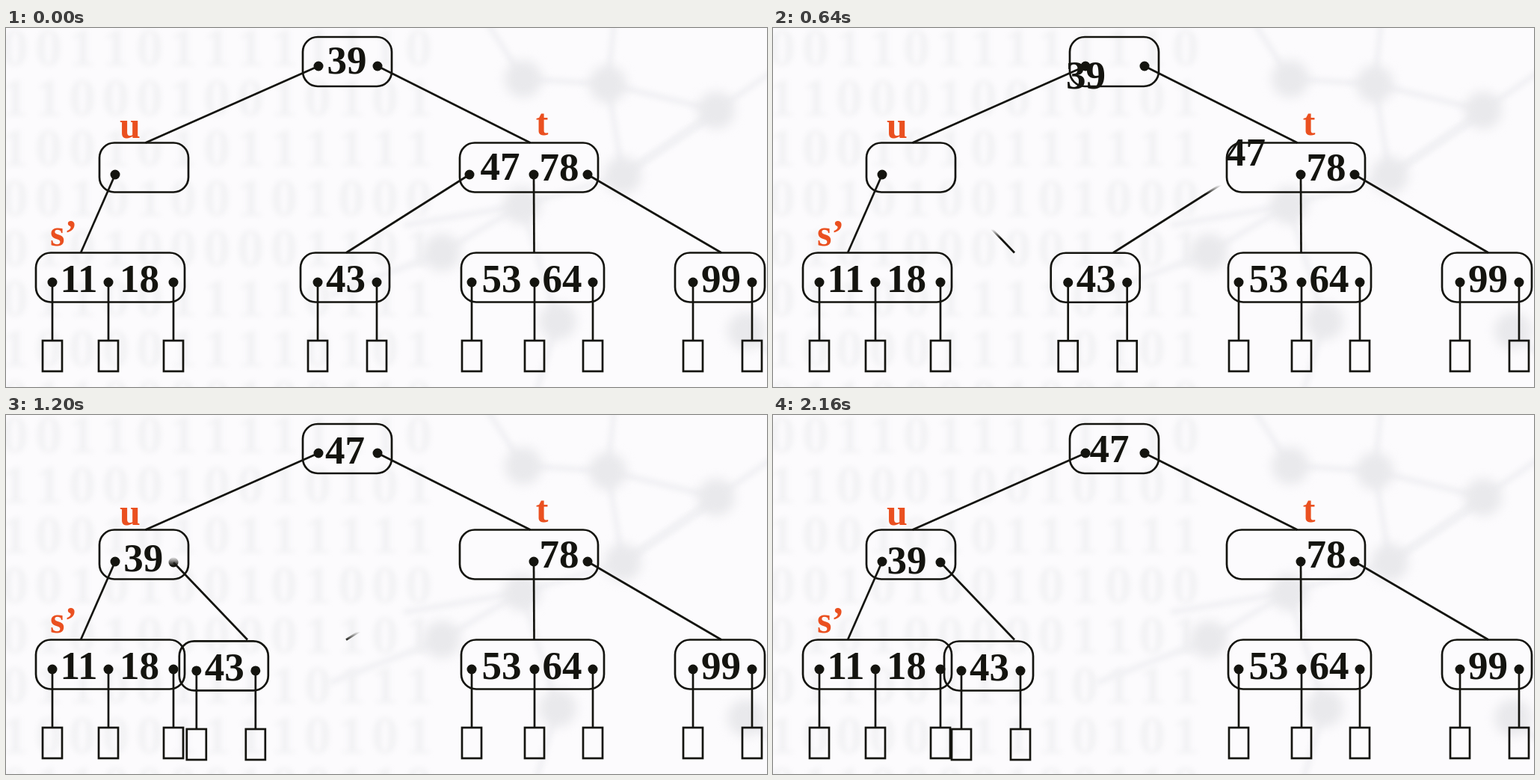
These frames come from a looping animation (1018x480 px, 2.2 s). An HTML page with a canvas:

```html
<!DOCTYPE html>
<html lang="en">
<head>
<meta charset="utf-8">
<title>Tree key transfer</title>
<style>
html, body { margin: 0; width: 100%; height: 100%; overflow: hidden; background: #fcfbfd; }
canvas { display: block; }
</style>
</head>
<body>
<canvas id="stage" width="1018" height="480"></canvas>
<script>
const W = 1018, H = 480, LOOP = 2200, STEP = 40, START = 366;
const PAPER = '#fcfbfd', INK = '#14140f', CLEAR = 'rgba(20,20,15,0)', LABEL = '#ea5020';
const SERIF = '"Liberation Serif", "Times New Roman", serif';
const ctx = document.getElementById('stage').getContext('2d');

// Vertical layout of the three tree levels
const ROOT = { top: 12, dot: 51, base: 61 };
const INNER = { top: 153.5, dot: 196, base: 204 };
const LEAF = { top: 300.5, dot: 340, base: 353 };

const node = (row, x, w, dots, keys = []) => ({ row, x, w, dots, keys });
const root = node(ROOT, 397, 119, [418, 497]);
const nodeU = node(INNER, 125, 119, [146]);
const nodeT = node(INNER, 607, 185, [706, 778], ['78']);
const left = node(LEAF, 40, 199, [62, 137, 224], ['11', '18']);
const moved = node(LEAF, 394, 119, [417, 496], ['43']);
const middle = node(LEAF, 609, 191, [623, 707, 785], ['53', '64']);
const right = node(LEAF, 895, 120, [919, 998], ['99']);

function layer() {
  const c = document.createElement('canvas');
  c.width = W;
  c.height = H;
  return c;
}

function line(g, x1, y1, x2, y2) {
  g.beginPath();
  g.moveTo(x1, y1);
  g.lineTo(x2, y2);
  g.stroke();
}

function disc(g, x, y, r) {
  g.beginPath();
  g.arc(x, y, r, 0, Math.PI * 2);
  g.fill();
}

function pen(g, paint = INK) {
  g.strokeStyle = g.fillStyle = paint;
  g.lineWidth = 2.7;
}

function text(g, str, x, y, size = 53) {
  g.font = `bold ${size}px ${SERIF}`;
  g.textAlign = 'center';
  g.fillText(str, x, y);
}

// Soft rows of binary digits
function paintDigits(g) {
  let seed = 17;
  const rand = () => (seed = (seed * 16807) % 2147483647) / 2147483647;
  g.filter = 'blur(3px)';
  g.fillStyle = '#f2f2f4';
  for (let y = 50; y < H + 50; y += 67) {
    for (let x = 12; x < 560; x += 45) text(g, rand() < 0.5 ? '0' : '1', x, y, 72);
  }
}

// Faint network: near nodes are linked, and each sends a spoke outward
function paintNetwork(g) {
  const hubs = [[692, 68], [805, 75], [950, 110], [825, 197], [690, 237], [583, 300], [738, 392], [990, 405]];
  g.filter = 'blur(3px)';
  g.strokeStyle = '#f1f1f4';
  g.lineWidth = 8;
  hubs.forEach(([x, y], i) => {
    for (const [px, py] of hubs.slice(0, i)) {
      if (Math.hypot(x - px, y - py) < 165) line(g, x, y, px, py);
    }
    const a = Math.atan2(y - 220, x - 790);
    line(g, x, y, x + 160 * Math.cos(a), y + 160 * Math.sin(a));
  });
  g.filter = 'blur(7px)';
  g.fillStyle = '#e9e9ec';
  for (const [x, y] of hubs) disc(g, x, y, 25);
}

function drawNode(g, { row, x, w, dots, keys }) {
  g.beginPath();
  g.roundRect(x, row.top, w, 66, 20);
  g.stroke();
  for (const d of dots) {
    disc(g, d, row.dot, 6.5);
    if (row === LEAF) {
      line(g, d, row.dot, d, 418);
      g.strokeRect(d - 13, 418, 26, 41);
    }
  }
  keys.forEach((k, i) => text(g, k, (dots[i] + dots[i + 1]) / 2 - 2, row.base));
}

function edge(g, from, i, to, x = to.x + to.w / 2 + 2) {
  line(g, from.dots[i], from.row.dot, x, to.row.top);
}

function makeStill() {
  const c = layer(), g = c.getContext('2d');
  g.fillStyle = PAPER;
  g.fillRect(0, 0, W, H);
  paintDigits(g);
  paintNetwork(g);
  g.filter = 'none';

  pen(g);
  for (const n of [root, nodeU, nodeT, left, middle, right]) drawNode(g, n);
  edge(g, root, 0, nodeU);
  edge(g, root, 1, nodeT);
  edge(g, nodeU, 0, left, 100);
  edge(g, nodeT, 0, middle);
  edge(g, nodeT, 1, right);

  g.fillStyle = LABEL;
  text(g, 'u', 166, 147, 50);
  text(g, 't', 717, 143, 50);
  text(g, 's’', 77, 291, 50);
  return c;
}

const still = makeStill();
const TOP = 190, SPAN = 111, SOFT = 12;

// An edge and its dot, visible only below a soft horizontal boundary
function wipedEdge(boundary, x, y, tx) {
  const paint = ctx.createLinearGradient(0, boundary, 0, boundary + SOFT);
  paint.addColorStop(0, CLEAR);
  paint.addColorStop(1, INK);
  pen(ctx, paint);
  disc(ctx, x, y, 6.5);
  line(ctx, x, y, tx, LEAF.top);
  pen(ctx);
}

function progress(t) {
  const d = Math.max(0, t - START);
  return Math.min(1, d * 0.00088 + d * d * 2.5e-7);
}

const ease = u => u < 0.5 ? 2 * u * u : 1 - 2 * (1 - u) ** 2;
const mix = (a, b, p) => a + (b - a) * p;

function draw(t) {
  const u = progress(t), p = ease(u), reach = u * (SPAN + SOFT);
  ctx.drawImage(still, 0, 0);
  pen(ctx);
  if (u > 0) wipedEdge(TOP + SPAN - reach, 224, 197, 323);
  if (u < 1) wipedEdge(TOP + reach - SOFT, 620, 196, 455);

  ctx.save();
  ctx.translate(-165 * p, 2 * p);
  drawNode(ctx, moved);
  ctx.restore();

  text(ctx, '39', mix(456, 179, p), mix(61, 212, p));
  text(ctx, '47', mix(661, 450, p), mix(203, 63, p));
}

const origin = performance.now();
function tick() {
  const t = (performance.now() - origin) % LOOP;
  draw(Math.floor(t / STEP) * STEP);
  requestAnimationFrame(tick);
}
tick();
</script>
</body>
</html>
```
